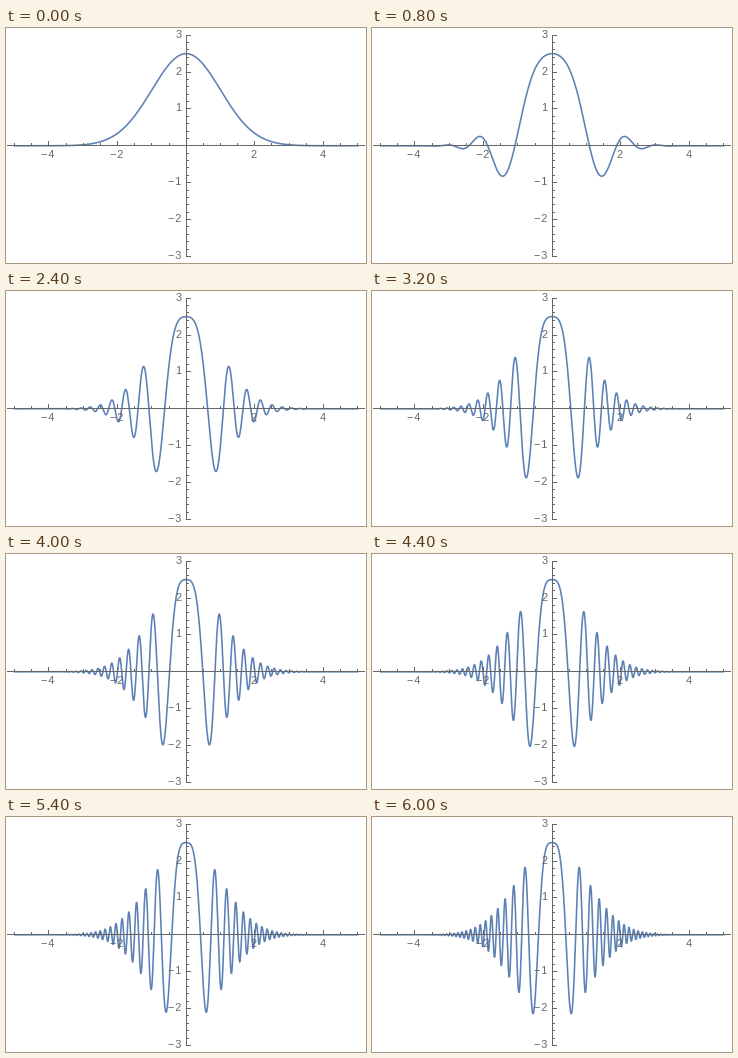
A matplotlib script that plays this animation: 360 by 235 pixels, repeating every 6.1 s.

```python
import numpy as np
import matplotlib.pyplot as plt
from matplotlib.animation import FuncAnimation

W, H, DPI = 360, 235, 100
PT = 72 / DPI                      # points per pixel
X0, Y0 = 180.15, 117.8             # plot origin in pixels
SX, SY = 34.3, 36.88               # pixels per unit
AXIS_X, AXIS_Y = 180.5, 117.5
MAJOR, MINOR = 4.5, 2.5            # tick lengths
GRAY, BLUE = "#666666", "#5e81b5"
FRAMES = 61

plt.rcParams["font.family"] = ["Liberation Sans", "DejaVu Sans"]
fig = plt.figure(figsize=(W / DPI, H / DPI), dpi=DPI, facecolor="white")
ax = fig.add_axes([0, 0, 1, 1])
ax.set_xlim(0, W)
ax.set_ylim(H, 0)
ax.axis("off")


def px(x):
    return X0 + SX * x


def py(y):
    return Y0 - SY * y


def crisp(v):
    return np.floor(v) + 0.5


def rule(xs, ys):
    # Coordinates already sit on pixel centres, so no snapping
    ax.plot(xs, ys, color=GRAY, lw=PT, solid_capstyle="butt", snap=False,
            zorder=3)


def label(x, y, value, ha):
    text = str(value).replace("-", "\u2212\u200a")
    ax.text(x, y, text, color=GRAY, size=11 * PT, ha=ha, va="center", zorder=3)


rule([1, 359], [AXIS_Y, AXIS_Y])
rule([AXIS_X, AXIS_X], [7, 229])

# Horizontal axis: labels every 2, minor ticks every 0.5
for k in range(-10, 11):
    if k == 0:
        continue
    major = k % 4 == 0
    x = crisp(px(k / 2))
    rule([x, x], [AXIS_Y, AXIS_Y - (MAJOR if major else MINOR)])
    if major:
        label(x - 0.8, 127, k // 2, "center")

# Vertical axis: labels every 1, minor ticks every 0.2
for k in range(-15, 16):
    if k == 0:
        continue
    major = k % 5 == 0
    y = crisp(py(k / 5))
    rule([AXIS_X, AXIS_X + (MAJOR if major else MINOR)], [y, y])
    if major:
        label(175.6, y - 0.25, k // 5, "right")

xs = np.linspace(-5, 5, 2401)
envelope = 2.5 * np.exp(-xs**2 / 2)
curve, = ax.plot([], [], color=BLUE, lw=1.6 * PT, solid_joinstyle="round",
                 zorder=2)


def draw(i):
    chirp = i / 6
    curve.set_data(px(xs), py(envelope * np.cos(chirp * xs**2)))
    return curve,


anim = FuncAnimation(fig, draw, frames=FRAMES, interval=100,
                     repeat=True, repeat_delay=0)
plt.show()
```
